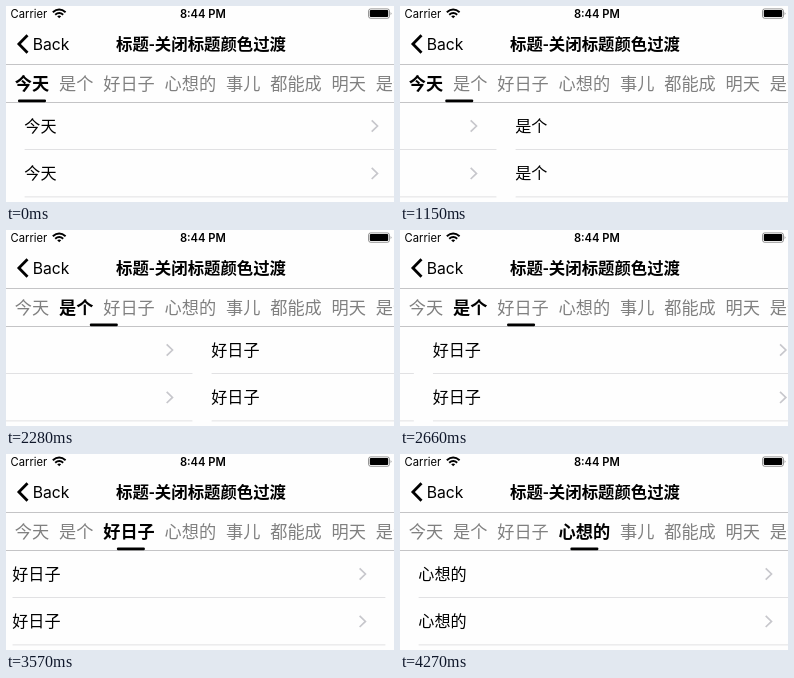
Animation of 388x196 px, one loop 5050 ms. Source, as an HTML page:

```html
<!DOCTYPE html>
<html lang="zh-CN">
<head>
<meta charset="utf-8">
<title>标题</title>
<style>
  html, body { margin: 0; width: 100%; height: 100%; overflow: hidden; background: #fefefe; }
  svg { display: block; width: 100%; height: 100%; }
  text { font-family: "Noto Sans CJK SC", "Noto Sans CJK", sans-serif; }
  .latin { font-family: Inter, Roboto, sans-serif; }
  .row { font-size: 16.1px; }
  .tab { font-size: 17.2px; fill: #808080; }
  .tab.on { font-weight: 700; fill: #000; }
  .line { fill: none; stroke: #000; }
  .rule { stroke: #c4c4c6; }
  .divider { stroke: #e1e1e3; }
  .more { fill: none; stroke: #c7c7cc; stroke-width: 1.7; }
</style>
</head>
<body>
<svg viewBox="0 0 388 196">
  <text class="latin" x="4.6" y="12.1" font-size="11.2">Carrier</text>
  <text class="latin" x="196.9" y="12.1" font-size="11.2" font-weight="600" text-anchor="middle">8:44 PM</text>
  <text class="latin" x="26.7" y="43.5" font-size="15.7">Back</text>
  <g class="line" stroke-width="2">
    <path d="M46.8 6.2Q53.2 .8 59.6 6.2M49.2 8.7Q53.2 5.4 57.2 8.7"/>
    <path d="M51.2 10.2Q53.2 8.6 55.2 10.2L53.2 12.2Z" fill="#000" stroke="none"/>
  </g>
  <rect class="line" x="362.5" y="2.9" width="21" height="9.4" rx="2.2" stroke-width=".9" opacity=".45"/>
  <rect x="363.8" y="4.1" width="18.4" height="7" rx="1"/>
  <path d="M384.7 6Q386.4 7.6 384.7 9.2Z" opacity=".5"/>
  <path class="line" d="M21.5 29.2L12.9 38L21.5 46.8" stroke-width="2.8"/>
  <text x="195" y="43.9" font-size="16.4" font-weight="700" text-anchor="middle">标题-关闭标题颜色过渡</text>
  <path class="rule" d="M0 58.5H388"/>
  <g id="tabs"></g>
  <g id="pages"></g>
  <path class="rule" d="M0 96.5H388"/>
  <rect id="bar" y="93.4" width="28" height="2.8" rx="1.2"/>
</svg>
<script>
const LOOP = 5050, PAGE = 392, FONT = 17.2, GAP = 9.8, BAR = 28;
const names = ["今天", "是个", "好日子", "心想的", "事儿", "都能成", "明天", "是个"];
const byId = id => document.getElementById(id);

// Each swipe: a drag that pauses part-way, then a release that settles on the next page.
const swipes = [
  { drag: [690, 830, 35], hold: 0.43, settle: [1090, 1420, 30] },
  { drag: [2110, 2280, 42.5], hold: 0.523, settle: [2490, 2830, 34] },
  { drag: [3570, 3690, 60], hold: 0.35, settle: [3930, 4270, 34] }
];

let x = 8.8;
const centers = [];
byId("tabs").innerHTML = names.map(name => {
  const left = x, width = name.length * FONT;
  centers.push(left + width / 2);
  x += width + GAP;
  return `<text class="tab" x="${left}" y="84.1">${name}</text>`;
}).join("");

const row = (name, y) => `
  <text class="row" x="18.3" y="${y + 5.8}">${name}</text>
  <path class="more" d="M365.7 ${y - 5.6}L371.5 ${y}L365.7 ${y + 5.6}"/>
  <path class="divider" d="M18.6 ${y + 23.5}H${PAGE - 0.5}"/>`;
byId("pages").innerHTML = names.slice(0, 4).map((name, i) =>
  `<g transform="translate(${i * PAGE})">${row(name, 120)}${row(name, 167.4)}</g>`).join("");

const tabs = [...byId("tabs").children];

// Time since the phase began, held between its steps.
const stepped = (t, [start, , step]) => Math.floor((t - start) / step + 1e-6) * step;

function swipeProgress(t, { drag, hold, settle }) {
  if (t < drag[0]) return 0;
  if (t >= settle[1]) return 1;
  if (t >= settle[0]) {
    const w = 0.0211 * (stepped(t, settle) + 30);
    return 1 - (1 - hold) * (1 + w) * Math.exp(-w);
  }
  const [start, end, step] = drag;
  const u = Math.min(1, (stepped(t, drag) + step) / (end - start + step));
  return hold * Math.pow(u * u * (3 - 2 * u), 1.8);
}

function draw(t) {
  const position = swipes.reduce((sum, swipe) => sum + swipeProgress(t, swipe), 0);
  const current = Math.floor(position), part = position - current;
  const next = Math.min(current + 1, centers.length - 1);
  const center = centers[current] + (centers[next] - centers[current]) * part;
  byId("pages").setAttribute("transform", `translate(${-position * PAGE})`);
  byId("bar").setAttribute("x", center - BAR / 2);
  tabs.forEach((tab, i) => tab.classList.toggle("on", i === current));
}

const begin = performance.now();
function tick() {
  draw((performance.now() - begin) % LOOP);
  requestAnimationFrame(tick);
}
tick();
</script>
</body>
</html>
```
